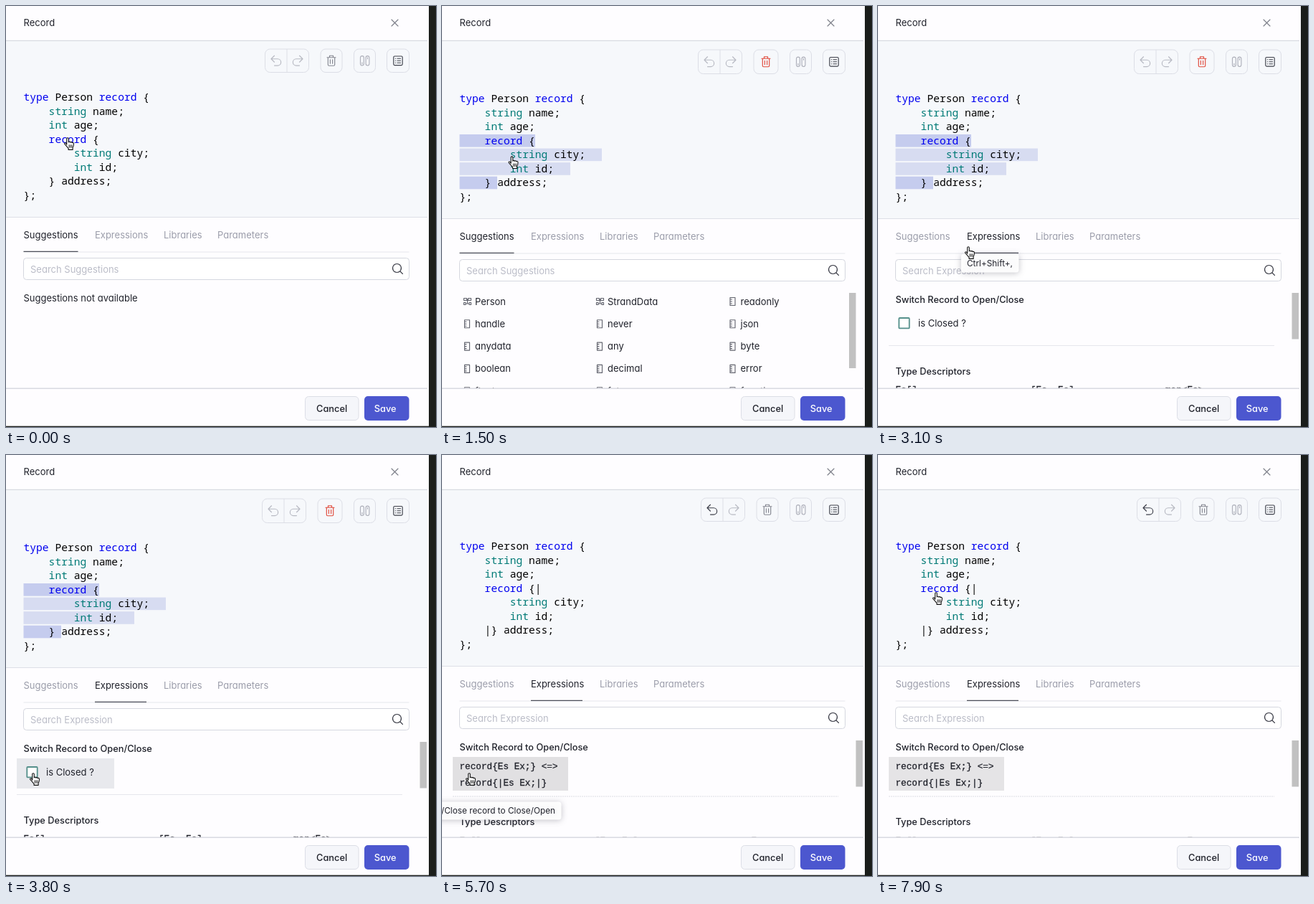
Animation, 600 px wide and 587 px high, one loop 8000 ms. Source, as an HTML page:

```html
<!DOCTYPE html>
<html lang="en">
<head>
<meta charset="utf-8">
<title>Record editor</title>
<style>
  html, body { margin: 0; width: 100%; height: 100%; overflow: hidden; background: #fefdff; }
  svg { position: absolute; left: 0; top: 0; display: block; }
  text { font: 13px Inter, sans-serif; font-feature-settings: "cv11"; fill: #20222b; white-space: pre; }
  text.strong { font-size: 12.8px; font-weight: 500; }
  text.tip { font-size: 11.8px; }
  text.dim { fill: #9b9daa; }
  text.hint { fill: #bbbdc8; }
  text.code { font: 14.63px "Noto Sans Mono", monospace; fill: #000; }
  text.expr { font: 12.7px "Liberation Mono", monospace; stroke: #20222b; stroke-width: .3px; }
  .key { fill: #0000ef; }
  .kind { fill: #007a76; }
  .icon { fill: none; stroke-width: 1.15; stroke-linecap: round; stroke-linejoin: round; }
  .tipbox { filter: drop-shadow(0 1px 4px rgba(40, 40, 60, .3)); }
</style>
</head>
<body>
<svg width="600" height="587" viewBox="0 0 600 587">
  <g id="view"></g>
  <g id="hand" stroke="#111" stroke-width="1.1" stroke-linejoin="round" stroke-linecap="round">
    <path fill="#fff" d="M4.2 10.2V2C4.2 .3 6.8 .3 6.8 2V7C7 5.9 9.2 5.9 9.3 7.2C9.8 6.2 11.6 6.4 11.7 7.8C12.4 7 14 7.2 14 8.9C14 12 13.4 13 12.6 14.5V17.4H6.6V15.6C5.2 14 3.6 11.8 1.4 9.6C.4 8.4 1.8 7.2 3 8.2Z"/>
    <path fill="none" stroke-width=".9" d="M7.6 10.8V14.4M9.5 10.8V14.4M11.4 10.8V14.4"/>
  </g>
</svg>
<script>
const LOOP = 8000, TICK = 100;

// Each step changes part of the interface state.
const steps = [
  [0, { selected: false, list: false, tab: 0, hover: false, closed: false, tip: '' }],
  [100, { selected: true }],
  [300, { list: true }],
  [2100, { tip: 'keys' }],
  [2500, { tab: 1 }],
  [3200, { tip: '' }],
  [3600, { hover: true }],
  [5200, { selected: false, closed: true }],
  [5500, { tip: 'switch' }],
  [7500, { tip: '', hover: false }]
];

// Pointer path: time, x, y.
const path = [
  [0, 88, 192], [1300, 88, 192], [2000, 146, 324], [3000, 146, 324],
  [3100, 128, 344], [3700, 40, 452], [7400, 40, 452], [7900, 83, 200], [8000, 83, 200]
];

const tabs = [['Suggestions', 24.5, 76], ['Expressions', 124, 72], ['Libraries', 220, 52], ['Parameters', 295, 71]];
const types = ['Person', 'StrandData', 'readonly', 'handle', 'never', 'json', 'anydata', 'any', 'byte',
  'boolean', 'decimal', 'error', 'float', 'future', 'function'];
const columns = [30, 215, 400.5];

const text = (x, y, str, cls = '', extra = '') => `<text x="${x}" y="${y}" class="${cls}" ${extra}>${str}</text>`;
const rect = (x, y, w, h, fill, extra = '') => `<rect x="${x}" y="${y}" width="${w}" height="${h}" fill="${fill}" ${extra}/>`;
const line = (x1, x2, y, color, width = 1, extra = '') =>
  `<path d="M${x1} ${y}H${x2}" stroke="${color}" stroke-width="${width}" ${extra}/>`;
const icon = (d, color, x = 0, y = 0) => `<path class="icon" d="${d}" stroke="${color}" transform="translate(${x} ${y})"/>`;
const frame = (x, y, w, h, fill, color, r) => rect(x, y, w, h, fill, `rx="${r}" stroke="${color}"`);

function toolbar(s) {
  const y = s.selected ? 61 : 60, h = s.selected ? 33.5 : 32.5;
  const dx = s.selected ? -4 : 0, mid = y + h / 2;
  const edge = '#dcdee6', off = '#b8bac3', on = '#3e404b';
  const box = (x, w) => frame(x, y, w, h, 'none', edge, 7);
  const back = 'M-2.5-7L-7-2.5L-2.5 2M-7-2.5H2a4.6 4.6 0 0 1 0 9.3H-2.5';
  const forth = 'M2.5-7L7-2.5L2.5 2M7-2.5H-2a4.6 4.6 0 0 0 0 9.3H2.5';
  const bin = 'M-6-4.5H6M-2.5-4.5V-7H2.5V-4.5M-4.7-4.5V5.5Q-4.7 7-3.2 7H3.2Q4.7 7 4.7 5.5V-4.5M-1.6-1.5V4M1.6-1.5V4';
  const pill = x => `M${x - 2.4}-4.3a2.4 2.4 0 0 1 4.8 0V4.3a2.4 2.4 0 0 1-4.8 0Z`;
  const bars = pill(-3.8) + pill(3.8) + 'M-3.8 2.5V4.5M3.8-4.5V-2.5';
  const sheet = 'M-4.7-6.3H4.7Q6.2-6.3 6.2-4.8V4.8Q6.2 6.3 4.7 6.3H-4.7Q-6.2 6.3-6.2 4.8V-4.8Q-6.2-6.3-4.7-6.3Z' +
    'M-3.6-3H-3.3M-1-3H3.6M-3.6 0H-3.3M-1 0H3.6M-3.6 3H-3.3M-1 3H3.6';
  return box(361.5 + dx, 61) + box(439 + dx, s.selected ? 34 : 30) + box(485.5, 30) + box(531.5, 31) +
    `<path d="M${392 + dx} ${y}v${h}" stroke="${edge}"/>` +
    icon(back, s.closed ? on : off, 377 + dx, mid) +
    icon(forth, off, 407 + dx, mid) +
    icon(bin, s.selected ? '#e0483a' : '#858791', s.selected ? 452 : 454, mid) +
    icon(bars, '#aeb0ba', 500.7, mid) +
    icon(sheet, on, 547, mid);
}

function code(s) {
  const [open, close] = s.closed ? ['{|', '|}'] : ['{', '}'];
  const rows = ['type Person record {', '    string name;', '    int age;', `    record ${open}`,
    '        string city;', '        int id;', `    ${close} address;`, '};'];
  const paint = row => row
    .replace(/\b(type|record)\b/g, '<tspan class="key">$1</tspan>')
    .replace(/\b(string|int)\b/g, '<tspan class="kind">$1</tspan>');
  const marks = [105.5, 198.5, 154.5, 52.5].map((w, i) =>
    rect(24.5, 177 + 19.57 * i, w, 17.6, i % 3 ? '#d7dcf1' : '#c5ccee')).join('');
  return (s.selected ? marks : '') + rows.map((row, i) => text(24.5, 132 + 19.57 * i, paint(row), 'code')).join('');
}

function suggestions() {
  const tree = 'M.5-4.5H4.5V-1.5H.5ZM6.5-4.5H10.5V-1.5H6.5ZM.5 1.5H3V4.5H.5ZM8 1.5H10.5V4.5H8ZM5.5-3V3M3 3H8';
  const rule = 'M1.5-5.5H8.5V5.5H1.5ZM1.5-3H4M1.5 0H4M1.5 3H4';
  return types.map((name, i) => {
    const x = columns[i % 3], y = 410 + 31.3 * Math.floor(i / 3);
    return icon(i < 2 ? tree : rule, '#63656f', x, y) + text(x + 16, y + 4.5, name);
  }).join('') + rect(568, 398, 9.5, 105, '#c1c1c1');
}

function expressions(s) {
  let out = text(24.5, 412, 'Switch Record to Open/Close', 'strong');
  if (s.closed) {
    out += rect(15, 421, 161, 47, s.hover ? '#e1e0e2' : '#e5e4e6') +
      text(24.5, 437.5, 'record{Es Ex;} &lt;=&gt;', 'expr') +
      text(24.5, 461, 'record{|Es Ex;|}', 'expr') +
      line(15, 553, 476, '#dcdde3', 1, 'stroke-dasharray="2 1"');
  } else {
    out += (s.hover ? rect(15, 421, 136, 42, '#e8e9ed') : '') +
      frame(29.3, 433, 14.4, 14.4, '#fff', '#55908b', 1).replace('/>', ' stroke-width="1.8"/>') +
      text(56, 445, 'is Closed ?') + line(15, 553, 471.5, '#e6e7ec');
  }
  const y = s.closed ? 516 : 511.5;
  return out + text(24.5, y, 'Type Descriptors', 'strong') +
    ['Es[]', '[Es, Es]', 'map&lt;Es&gt;'].map((e, i) => text([24.5, 213, 401][i], y + 25.5, e, 'expr')).join('') +
    rect(577.5, 398, 9.5, 64.5, '#c1c1c1');
}

function panel(s) {
  const [, x, w] = tabs[s.tab];
  const body = s.tab ? expressions(s) : s.list ? suggestions() : text(24.5, 412, 'Suggestions not available');
  return rect(0, 294, 588, 293, '#fefdff') + line(0, 588, 294.5, '#dddfe6') +
    tabs.map(([name, tx], i) => text(tx, 324, name, i === s.tab ? '' : 'dim')).join('') +
    line(24.5, 562.5, 343, '#e6e7ec') + line(x, x + w, 342.4, '#4c4e59', 1.3) +
    frame(24.5, 351.5, 538, 30, '#fff', '#d5d7df', 4) +
    text(34, 371.5, s.tab ? 'Search Expression' : 'Search Suggestions', 'hint') +
    icon('M545.5 359.5a6 6 0 1 0 .01 0M550 370L553.5 373.5', '#3f414b') + body;
}

function footer() {
  return rect(0, 533, 590, 54, '#fefdff') + line(0, 588, 533.3, '#d9dae1', 1.4) +
    frame(417.5, 544.5, 74.5, 33, '#f5f6fa', '#dcdee6', 5) + text(433, 566, 'Cancel', 'strong') +
    rect(500, 544, 62.5, 34, '#4c57cf', 'rx="5"') + text(513.8, 566, 'Save', 'strong', 'style="fill:#fff"') +
    rect(0, 585.7, 600, 2, '#1b1e1b') + rect(590, 0, 10, 587, '#1a1d1a');
}

function tooltip(kind) {
  const box = (x, y, w, h) => rect(x, y, w, h, '#fff', 'rx="4" fill-opacity=".94" class="tipbox"');
  if (kind === 'keys') return box(116, 345.5, 80.5, 26) + text(124, 363, 'Ctrl+Shift+,', 'tip');
  if (kind === 'switch') return box(-80, 483.5, 246.5, 25) +
    text(158, 500.3, 'Switch Open/Close record to Close/Open', 'tip', 'text-anchor="end"');
  return '';
}

function draw(s) {
  return rect(0, 0, 600, 587, '#fefdff') + rect(0, 48, 588, 250, '#f6f8fb') + line(0, 588, 48.3, '#d8dae1', 1.2) +
    text(24.5, 27.5, 'Record') + icon('M538 19L547 28M547 19L538 28', '#7c7e88') + toolbar(s) +
    `<g transform="translate(0 ${s.selected ? 2 : 0})">${code(s)}${panel(s)}</g>` +
    footer() + tooltip(s.tip);
}

function pointer(t) {
  const i = path.findIndex((p, n) => t < path[n + 1][0]);
  const [t0, x0, y0] = path[i], [t1, x1, y1] = path[i + 1];
  const p = (t - t0) / (t1 - t0), e = p * p * (3 - 2 * p);
  return [x0 + (x1 - x0) * e, y0 + (y1 - y0) * e];
}

const view = document.getElementById('view');
const hand = document.getElementById('hand');
let shown = 0;

function render(now) {
  const t = Math.floor((now % LOOP) / TICK) * TICK;
  const past = steps.filter(([at]) => at <= t);
  if (past.length !== shown) {
    shown = past.length;
    view.innerHTML = draw(Object.assign({}, ...past.map(p => p[1])));
  }
  const [x, y] = pointer(t);
  hand.setAttribute('transform', `translate(${x - 7.5} ${y - 9})`);
}

const start = performance.now();
function loop() {
  render(performance.now() - start);
  requestAnimationFrame(loop);
}
loop();
</script>
</body>
</html>
```
